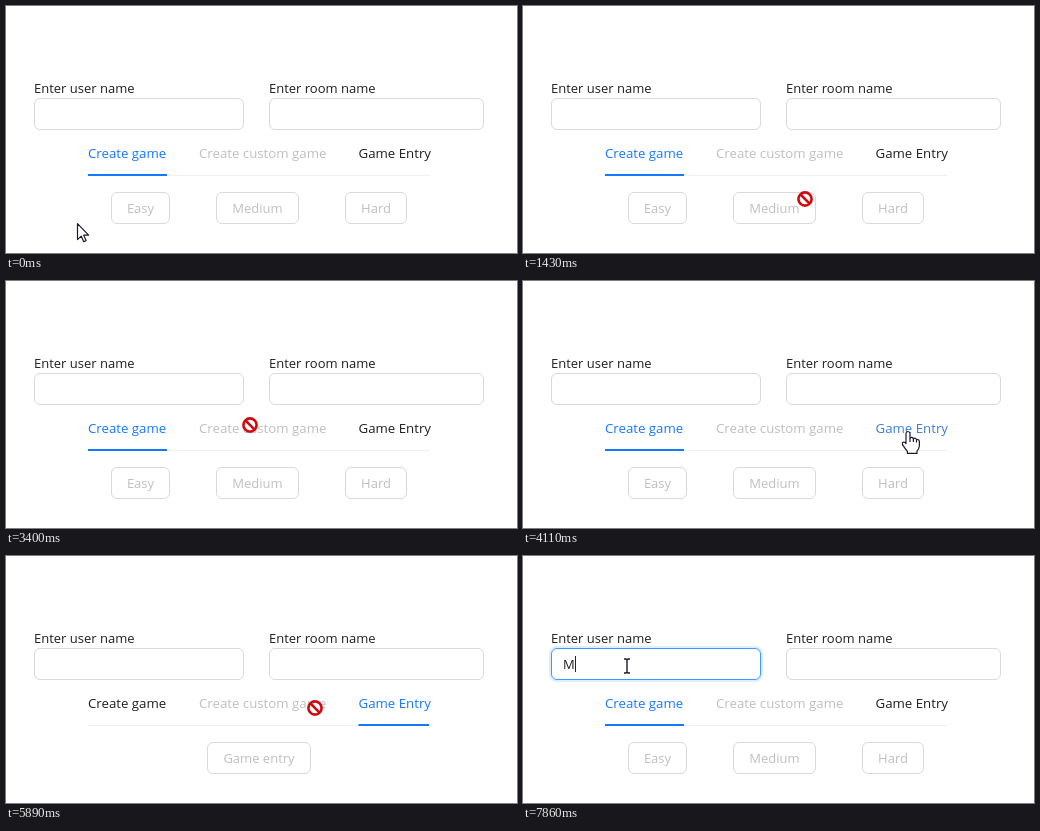
Recreate the animation shown at these times as an HTML page. Size 511 px wide and 247 px high, loop 8 s.

```html
<!DOCTYPE html>
<html lang="en">
<head>
<meta charset="utf-8">
<title>Create game</title>
<style>
  html, body { margin: 0; width: 100%; height: 100%; overflow: hidden; background: #fff; }
  svg { display: block; width: 511px; height: 247px; }
  text { font: 13px "Open Sans", "Noto Sans", sans-serif; fill: #1f1f1f; white-space: pre; }
  .tab { font-size: 13.25px; }
  .off { fill: #bfbfbf; }
  .box { fill: #fff; stroke: #d9d9d9; }
  .cursor { stroke: #1b1a2e; stroke-width: 1.2; stroke-linejoin: round; fill: #fff; }
</style>
</head>
<body>
<svg viewBox="0 0 511 247">
  <text x="28" y="87">Enter user name</text>
  <text x="263" y="87">Enter room name</text>
  <rect id="ring" x="27" y="91" width="212" height="34" rx="7" fill="none" stroke="#0591ff" stroke-opacity=".14" stroke-width="2"/>
  <rect id="user" class="box" x="28.5" y="92.5" width="209" height="31" rx="5.5"/>
  <rect class="box" x="263.5" y="92.5" width="214" height="31" rx="5.5"/>
  <text id="typed" x="40" y="113">M</text>
  <rect id="caret" y="100" width="1" height="16" fill="#222"/>

  <rect x="82" y="169" width="342" height="1" fill="#f0f0f0"/>
  <text id="create" class="tab" x="82" y="152">Create game</text>
  <text class="tab off" x="193" y="152">Create custom game</text>
  <text id="entry" class="tab" x="352.5" y="152">Game Entry</text>
  <rect id="ink" y="168" height="2" fill="#1677ff"/>

  <g id="levels"></g>
  <g id="join"></g>

  <circle id="press" r="12" fill="#f2ea00" fill-opacity=".62"/>
  <g id="pointer">
    <path id="arrow" class="cursor" d="M.5 .6V16.6L4.2 13.1 6.7 18.7 9.1 17.6 6.7 12.2H11.6Z"/>
    <g id="hand" class="cursor">
      <path d="M-2 2Q0-1 2 2V7Q4.2 5.6 5.4 7.6 7.6 6.4 8.5 8.6 11 8 11.4 10.8V15Q11 18 9 20V22.4H-.6V20.4Q-3 17.5-5.5 13.6-6 11-4 11-3 11.2-2 12.6Z"/>
      <path fill="none" d="M2 7V11M5.4 7.6V11M8.5 8.6V11.5"/>
    </g>
    <g id="no" stroke="#d2080c" stroke-width="2.6">
      <circle r="6.6" fill="#fff"/>
      <path d="M-4.6-4.6 4.6 4.6"/>
    </g>
    <path id="beam" fill="none" stroke="#1b1a2e" stroke-width="1.4" d="M-3-7H-1L0-6 1-7H3M0-6V6M-3 7H-1L0 6 1 7H3"/>
  </g>
</svg>
<script>
const LOOP = 8000;
const DARK = [31, 31, 31], BLUE = [22, 119, 255], HOVER = [64, 150, 255], DOWN = [42, 111, 219], GREY = [217, 217, 217];
const TO_ENTRY = 4440, TO_CREATE = 6920, FOCUS = 7290, TYPE = 7830;

// Pointer way points: time, x, y
const PATH = [
  [0, 71, 217], [40, 71, 217], [200, 135, 212], [430, 252, 199], [620, 313, 206],
  [790, 313, 206], [1050, 279, 197], [1230, 282, 193], [1425, 282, 193],
  [1800, 362, 208], [2200, 218, 178], [2240, 218, 178], [2690, 116, 151],
  [3080, 116, 151], [3400, 244, 144], [3560, 285, 140], [3880, 349, 158],
  [4110, 385, 150], [5130, 385, 150], [5210, 382, 149], [5400, 382, 149],
  [5640, 338, 164], [5890, 309, 152], [6210, 235, 150], [6450, 200, 138],
  [6720, 94, 152], [7070, 94, 152], [7280, 104, 110], [LOOP, 104, 110]
];
const PRESSES = [[2890, 3085], [4290, TO_ENTRY], [6780, TO_CREATE], [7280, 7420]];

// Hot areas: cursor, left, top, right, bottom
const AREAS = [
  ["no", 105, 186, 164, 218], ["no", 210, 186, 293, 218], ["no", 339, 186, 401, 218],
  ["hand", 82, 135, 161, 170], ["no", 193, 130, 321, 170], ["hand", 352, 135, 424, 170],
  ["beam", 28, 92, 238, 124], ["beam", 263, 92, 478, 124]
];

const el = id => document.getElementById(id);
const set = (id, attrs) => { for (const k in attrs) el(id).setAttribute(k, attrs[k]); };
const show = (id, on) => set(id, { visibility: on ? "visible" : "hidden" });
const mix = (a, b, p) => a + (b - a) * p;

function ease(t, start, length = 300) {
  const p = Math.min(1, Math.max(0, (t - start) / length));
  return p * p * (3 - 2 * p);
}

// Colour after a series of fades: [[time, colour], ...]
function fade(t, from, steps, length) {
  const rgb = steps.reduce((c, [at, to]) => c.map((v, i) => mix(v, to[i], ease(t, at, length))), from);
  return `rgb(${rgb.map(Math.round)})`;
}

const slope = (i, axis) => {
  const a = PATH[i], b = PATH[i + 1];
  return a && b ? (b[axis] - a[axis]) / (b[0] - a[0]) : 0;
};

function tangent(i, axis) {
  const a = slope(i - 1, axis), b = slope(i, axis);
  return a * b > 0 ? 2 * a * b / (a + b) : 0;
}

// Monotone cubic through the way points
function along(t, axis) {
  const i = PATH.findIndex((k, n) => n && t < k[0]) - 1;
  const a = PATH[i], b = PATH[i + 1], d = b[0] - a[0], p = (t - a[0]) / d, q = 1 - p;
  return a[axis] * (1 + 2 * p) * q * q + b[axis] * p * p * (3 - 2 * p)
    + d * p * q * (tangent(i, axis) * q - tangent(i + 1, axis) * p);
}

function button(x, width, label) {
  return `<rect class="box" x="${x + .5}" y="186.5" width="${width - 1}" height="31" rx="5.5"/>
    <text class="off" x="${x + width / 2}" y="207" text-anchor="middle">${label}</text>`;
}

function drawPointer(t) {
  const x = Math.round(along(t, 1)), y = Math.round(along(t, 2));
  const area = AREAS.find(([, l, top, r, b]) => x >= l && x < r && y >= top && y < b);
  const kind = area ? area[0] : "arrow";
  for (const id of ["arrow", "hand", "no", "beam"]) show(id, id === kind);
  set("pointer", { transform: `translate(${x} ${y})` });
  set("press", { cx: x, cy: y });
  show("press", PRESSES.some(([from, to]) => t >= from && t < to));
}

function drawTabs(t) {
  const p = ease(t, TO_ENTRY) - ease(t, TO_CREATE);
  set("ink", { x: mix(82, 352.5, p), width: mix(79, 70.5, p) });
  set("levels", { opacity: 1 - p });
  set("join", { opacity: p });
  el("create").style.fill = fade(t, BLUE, [[TO_ENTRY, DARK], [6600, HOVER], [6780, DOWN], [TO_CREATE, BLUE]], 300 - 240 * (t > 6780 && t < TO_CREATE));
  el("entry").style.fill = fade(t, DARK, [[3895, HOVER], [TO_ENTRY, BLUE], [TO_CREATE, DARK]]);
}

function drawInput(t) {
  const typed = t >= TYPE;
  el("user").style.stroke = fade(t, GREY, [[7210, HOVER]], 200);
  set("ring", { opacity: ease(t, FOCUS, 200) });
  show("typed", typed);
  show("caret", t >= FOCUS);
  set("caret", { x: typed ? 52 : 40 });
}

function frame() {
  const t = performance.now() % LOOP;
  drawTabs(t);
  drawInput(t);
  drawPointer(t);
  requestAnimationFrame(frame);
}

el("levels").innerHTML = button(105, 59, "Easy") + button(210, 83, "Medium") + button(339, 62, "Hard");
el("join").innerHTML = button(201, 104, "Game entry");
frame();
</script>
</body>
</html>
```
